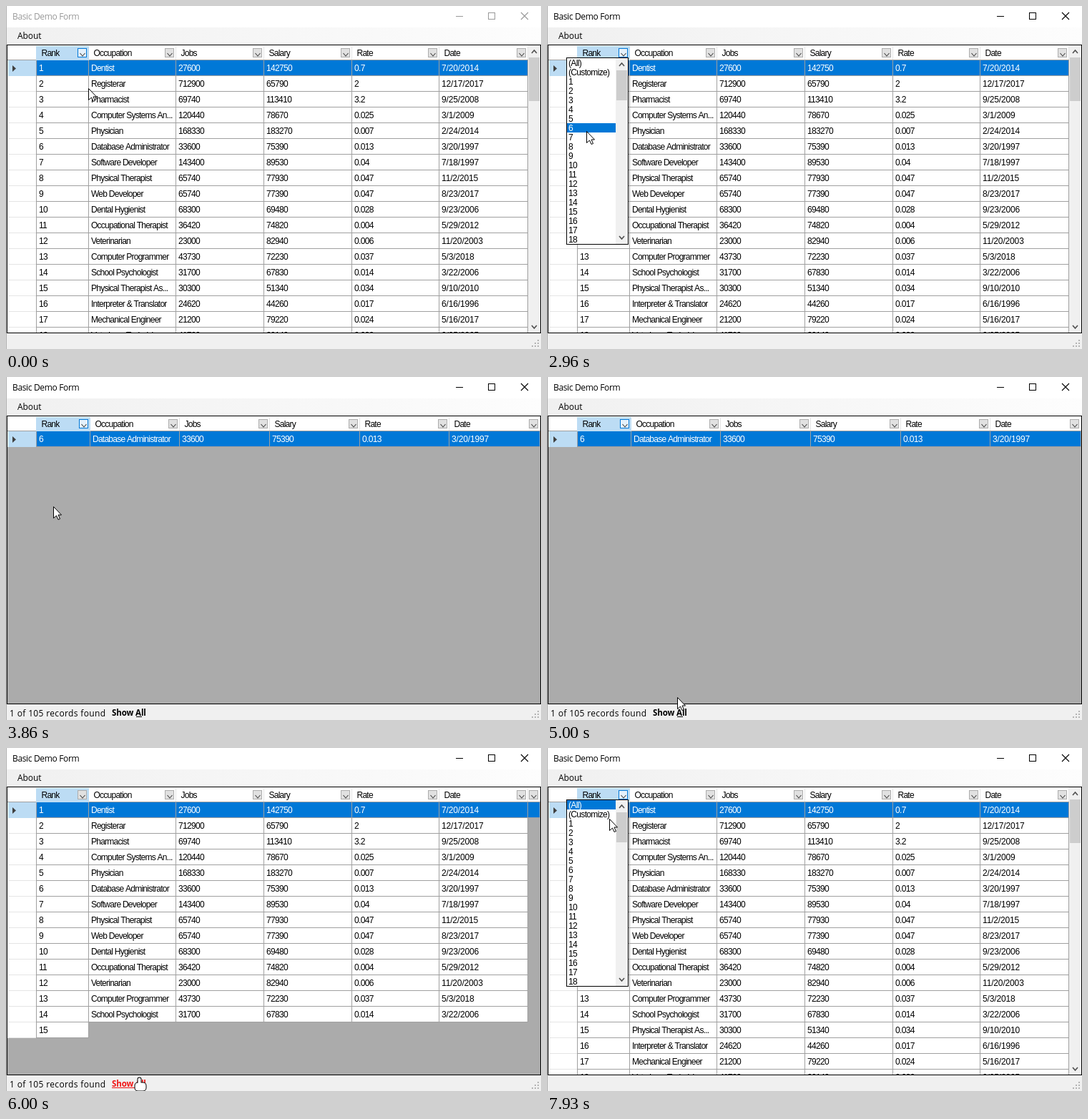
An HTML page with a canvas for the animation above (8000 ms loop, 748x480 px).

```html
<!DOCTYPE html>
<html lang="en">
<head>
<meta charset="utf-8">
<title>Basic Demo Form</title>
<style>
  html, body { margin: 0; width: 100%; height: 100%; overflow: hidden; background: #fff; }
  canvas { display: block; }
</style>
</head>
<body>
<canvas width="748" height="480"></canvas>
<script>
const ctx = document.querySelector('canvas').getContext('2d');
const DURATION = 8000;
const BLUE = '#0078d7', PALE_BLUE = '#bcdcf4', GRAY = '#ababab', LINE = '#a0a0a0', LIGHT = '#e5e5e5';
const GRID_FONT = '12px "Liberation Sans", Arial, sans-serif';
const UI_FONT = '12px "Open Sans", "Noto Sans", sans-serif';
const LINK_FONT = 'bold 11.5px "Open Sans", "Noto Sans", sans-serif';
const WORDS = -.75, DIGITS = -.67, DATES = -.15; // letter spacing

const GRID_TOP = 76, ROW_HEIGHT = 22, ITEM_HEIGHT = 13;
const OPEN = 1580, PICK = 2890, FILTER = 3100, PRESS = 5720, REPAINT = 5890, RESTORE = 6030, REOPEN = 7440;

const TITLES = ['Rank', 'Occupation', 'Jobs', 'Salary', 'Rate', 'Date'];
const ROWS = `Dentist|27600|142750|0.7|7/20/2014
Registerar|712900|65790|2|12/17/2017
Pharmacist|69740|113410|3.2|9/25/2008
Computer Systems An...|120440|78670|0.025|3/1/2009
Physician|168330|183270|0.007|2/24/2014
Database Administrator|33600|75390|0.013|3/20/1997
Software Developer|143400|89530|0.04|7/18/1997
Physical Therapist|65740|77930|0.047|11/2/2015
Web Developer|65740|77390|0.047|8/23/2017
Dental Hygienist|68300|69480|0.028|9/23/2006
Occupational Therapist|36420|74820|0.004|5/29/2012
Veterinarian|23000|82940|0.006|11/20/2003
Computer Programmer|43730|72230|0.037|5/3/2018
School Psychologist|31700|67830|0.014|3/22/2006
Physical Therapist As...|30300|51340|0.034|9/10/2010
Interpreter & Translator|24620|44260|0.017|6/16/1996
Mechanical Engineer|21200|79220|0.024|5/16/2017
Veterinary Technician|41700|30140|0.030|9/25/2005`
  .split('\n').map((line, i) => [String(i + 1), ...line.split('|')]);
const OPTIONS = ['(All)', '(Customize)', ...ROWS.map(row => row[0])];

// Column edges: a narrow rank column, then equal shares of the width.
const columnEdges = (first, step, right) =>
  [42, ...TITLES.slice(1).map((_, i) => Math.floor(first + step * i)), right];
const FULL_EDGES = columnEdges(115, 122.7, 729);
const FILTERED_EDGES = columnEdges(117.3, 125.6, 746);

const POINTER_MOVES = [
  { from: 280, to: 1060, x: 106, y: 67 },
  { from: 2030, to: 2720, x: 55, y: 175 },
  { from: 3830, to: 4000, x: 179, y: 240 },
  { from: 4380, to: 4620, x: 167, y: 376 },
  { from: 4790, to: 5070, x: 185, y: 461 },
  { from: 6060, to: 6270, x: 125, y: 137 },
  { from: 6480, to: 7030, x: 108, y: 68 },
  { from: 7720, to: 7930, x: 87, y: 99 }
];

function smooth(k) {
  k = Math.min(1, Math.max(0, k));
  return k * k * (3 - 2 * k);
}

function pointerAt(t) {
  let x = 115, y = 115;
  for (const move of POINTER_MOVES) {
    const k = smooth((t - move.from) / (move.to - move.from));
    x += (move.x - x) * k;
    y += (move.y - y) * k;
  }
  return [Math.round(x), Math.round(y)];
}

function rect(x, y, w, h, color) {
  ctx.fillStyle = color;
  ctx.fillRect(x, y, w, h);
}

function frame(x, y, w, h, color) {
  ctx.strokeStyle = color;
  ctx.lineWidth = 1;
  ctx.strokeRect(x + .5, y + .5, w - 1, h - 1);
}

function text(str, x, y, color = '#000', font = GRID_FONT, spacing = WORDS) {
  ctx.font = font;
  ctx.letterSpacing = spacing + 'px';
  ctx.fillStyle = color;
  ctx.fillText(str, x, y);
}

function stroke(path, color, width = 1) {
  ctx.strokeStyle = color;
  ctx.lineWidth = width;
  ctx.stroke(new Path2D(path));
}

function chevron(x, y, dir, color, width) {
  stroke(`M${x - 3.5} ${y - 2 * dir} L${x} ${y + 2 * dir} L${x + 3.5} ${y - 2 * dir}`, color, width);
}

function clipped(x, y, w, h, paint) {
  ctx.save();
  ctx.beginPath();
  ctx.rect(x, y, w, h);
  ctx.clip();
  paint();
  ctx.restore();
}

function scrollbar(x, top, bottom, w, thumbTop, thumbBottom) {
  rect(x, top, w, bottom - top, '#f0f0f0');
  rect(x + 1, thumbTop, w - 2, thumbBottom - thumbTop, '#cdcdcd');
  chevron(x + w / 2, top + 9, -1, '#505050', 1.6);
  chevron(x + w / 2, bottom - 9, 1, '#505050', 1.6);
}

function filterButton(right, hot) {
  const x = right - 15;
  rect(x, 59, 13, 13, hot ? '#e5f1fb' : '#e1e1e1');
  frame(x, 59, 13, 13, hot ? BLUE : '#adadad');
  chevron(x + 7, 68, 1, '#444', 1.1);
}

function drawWindow(active) {
  const ink = active ? '#000' : '#999';
  rect(0, 0, 748, 480, '#fff');
  text('Basic Demo Form', 9, 19, ink, UI_FONT, -.35);
  rect(629, 14, 10, 1, ink);
  frame(674, 9, 10, 10, ink);
  stroke('M720 9 l10 10 m0 -10 l-10 10', ink, 1.1);

  const menu = ctx.createLinearGradient(0, 0, 748, 0);
  menu.addColorStop(0, '#f0f0f0');
  menu.addColorStop(1, '#fdfdfd');
  rect(0, 30, 748, 24, menu);
  text('About', 16, 46, '#000', UI_FONT, -.1);

  rect(0, 458, 748, 22, '#f0f0f0');
  for (let row = 0; row < 3; row++)
    for (let col = 0; col <= row; col++) rect(743 - col * 4, 467 + row * 4, 2, 2, '#b4b4b4');
  rect(0, 0, 1, 480, '#b0b0b0');
  rect(1, 54, 747, 404, GRAY);
}

function drawHeader(edges, hot) {
  const [left, second] = edges, right = edges.at(-1);
  rect(2, 55, right - 1, 21, '#fff');
  rect(2, 75, right - 1, 1, LINE);
  edges.forEach(x => rect(x, 56, 1, 19, LIGHT));
  rect(left, 56, second - left + 1, 20, PALE_BLUE);
  TITLES.forEach((title, i) => {
    text(title, edges[i] + 7.5, 70);
    filterButton(edges[i + 1], hot && i === 0);
  });
}

function drawRow(row, index, edges, cellCount = row.length) {
  const top = GRID_TOP + index * ROW_HEIGHT, bottom = top + ROW_HEIGHT - 1;
  const selected = index === 0;
  rect(2, top, 40, ROW_HEIGHT, '#fff');
  rect(3, bottom, 39, 1, LIGHT);
  rect(edges[0], top, 1, ROW_HEIGHT, LINE);
  for (let i = 0; i < cellCount; i++) {
    const left = edges[i] + 1, width = edges[i + 1] - edges[i];
    rect(left, top, width, ROW_HEIGHT, selected ? BLUE : '#fff');
    rect(left, bottom, width, 1, LINE);
    rect(edges[i + 1], top, 1, ROW_HEIGHT, LINE);
    const spacing = { Occupation: WORDS, Date: DATES }[TITLES[i]] ?? DIGITS;
    text(row[i], left + 3, top + 15, selected ? '#fff' : '#000', GRID_FONT, spacing);
  }
  if (selected) {
    rect(3, top, 39, ROW_HEIGHT, PALE_BLUE);
    ctx.fillStyle = '#404040';
    ctx.fill(new Path2D('M9 83 l5 4.5 l-5 4.5 z'));
  }
}

function drawGrid(edges, rows, hot) {
  drawHeader(edges, hot);
  rows.forEach((row, i) => drawRow(row, i, edges));
}

// The full table repaints over the filtered one from the top down.
function drawRepaint(progress) {
  const count = Math.min(14, Math.floor(14 * progress));
  drawHeader(FULL_EDGES, false);
  ROWS.slice(0, count).forEach((row, i) => drawRow(row, i, FULL_EDGES));
  drawRow(ROWS[count], count, FULL_EDGES, 1);
}

function drawContent(t) {
  if (t >= FILTER && t < RESTORE) {
    drawGrid(FILTERED_EDGES, [ROWS[5]], t < REPAINT);
    if (t >= REPAINT) drawRepaint((t - REPAINT) / 110);
  } else {
    drawGrid(FULL_EDGES, ROWS, t < FILTER || t >= REOPEN);
    scrollbar(730, 55, 458, 17, 72, 133);
  }
}

function drawDropdown(selected) {
  rect(27, 72, 87, 262, '#fff');
  clipped(28, 73, 85, 260, () => {
    OPTIONS.forEach((option, i) => {
      const top = 73 + i * ITEM_HEIGHT, chosen = i === selected;
      if (chosen) rect(28, top, 68, ITEM_HEIGHT, BLUE);
      text(option, 30, top + 11, chosen ? '#fff' : '#000', GRID_FONT, DIGITS);
    });
    scrollbar(96, 73, 333, 17, 90, 132);
  });
  frame(27, 72, 87, 262, '#000');
}

function drawStatus(hover, pressed) {
  const color = pressed ? '#f01414' : '#000';
  text('1 of 105 records found', 5, 475, '#000', UI_FONT, .35);
  text('Show All', 148, 474, color, LINK_FONT, -.1);
  if (hover) rect(148, 475, 48, 1, color);
  else rect(182, 475, 8, 1, color);
}

function drawPointer(x, y, hand) {
  ctx.save();
  ctx.translate(x + .5, y + .5);
  const outline = new Path2D(hand ? '' : 'M0 0 V16 L4 12.5 L6.5 18 L9 17 L6.5 11.5 H11 z');
  if (hand) {
    outline.roundRect(-1, 0, 4, 12, 2);
    outline.roundRect(-5, 7, 15, 11, 4);
  }
  ctx.strokeStyle = '#000';
  ctx.lineWidth = hand ? 2 : 1;
  ctx.fillStyle = '#fff';
  if (hand) ctx.stroke(outline);
  ctx.fill(outline);
  if (!hand) ctx.stroke(outline);
  ctx.restore();
}

function draw(t) {
  const [x, y] = pointerAt(t);
  const overLink = y >= 458;
  drawWindow(t >= OPEN);
  clipped(2, 55, 745, 402, () => drawContent(t));
  frame(1, 54, 747, 404, '#000');
  if (t >= OPEN && t < FILTER) drawDropdown(t >= PICK ? OPTIONS.indexOf('6') : -1);
  if (t >= REOPEN) drawDropdown(0);
  if (t >= FILTER && t < RESTORE + 30) drawStatus(overLink, t >= PRESS);
  drawPointer(x, y, overLink);
}

function tick() {
  draw(performance.now() % DURATION);
  requestAnimationFrame(tick);
}
tick();
</script>
</body>
</html>
```
